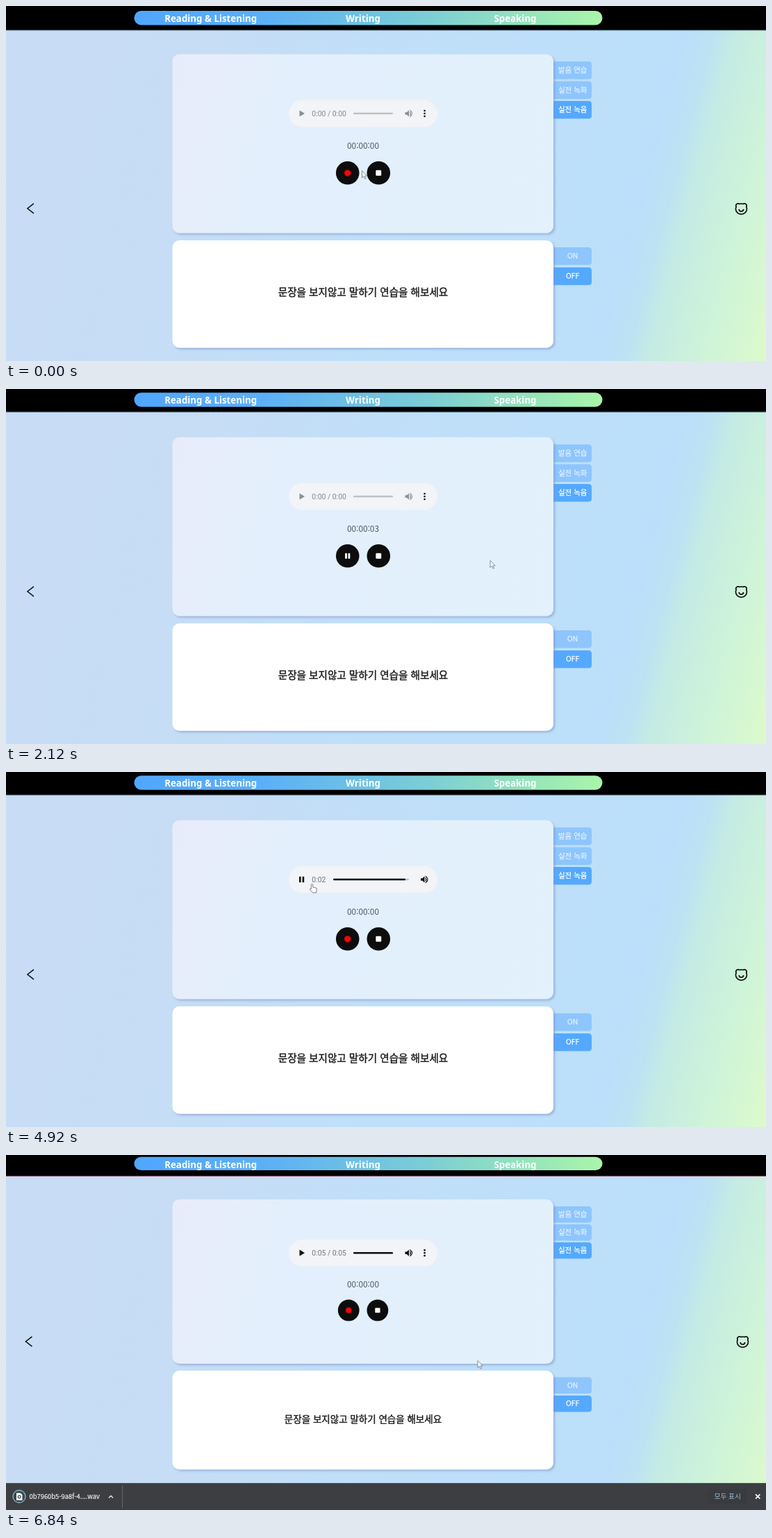
An HTML page for the animation above (6880 ms loop, 1094 by 512 pixels).

```html
<!DOCTYPE html>
<html lang="ko">
<head>
<meta charset="utf-8">
<title>Speaking practice</title>
<style>
html, body { margin: 0; width: 100%; height: 100%; overflow: hidden; background: #000; }
svg { display: block; width: 1094px; height: 512px; }
text { font-family: "Noto Sans CJK KR", "Noto Sans CJK", "Noto Sans KR", sans-serif; }
.nav { font: 700 13.3px "Noto Sans", sans-serif; fill: #fff; text-anchor: middle; }
.tab { font-size: 10.5px; fill: #fff; stroke: #fff; stroke-width: .25px; text-anchor: middle; }
.say { fill: #1c1c1e; stroke: #1c1c1e; stroke-width: .4px; text-anchor: middle; }
.clock { font-size: 11.8px; fill: #4c5560; text-anchor: middle; }
.time { font: 10.4px Roboto, sans-serif; }
.file { font-size: 9.4px; fill: #f1f3f4; stroke: #f1f3f4; stroke-width: .2px; }
.all { font-size: 9.7px; fill: #9cbfd8; text-anchor: middle; }
</style>
</head>
<body>
<svg viewBox="0 0 1094 512">
  <defs>
    <linearGradient id="sky" gradientUnits="userSpaceOnUse" x1="-23" y1="119" x2="1117" y2="425">
      <stop offset="0" stop-color="#c9dcf5"/>
      <stop offset=".25" stop-color="#c6ddf5"/>
      <stop offset=".5" stop-color="#c0dff9"/>
      <stop offset=".8" stop-color="#bbdffa"/>
      <stop offset=".835" stop-color="#bde3f3"/>
      <stop offset=".86" stop-color="#c4ebe4"/>
      <stop offset=".93" stop-color="#cff4d8"/>
      <stop offset="1" stop-color="#dcfacb"/>
    </linearGradient>
    <linearGradient id="glass" gradientUnits="userSpaceOnUse" x1="240" y1="150" x2="788" y2="297">
      <stop offset="0" stop-color="#e7ecfa"/>
      <stop offset=".13" stop-color="#e6eefb"/>
      <stop offset=".26" stop-color="#e3effc"/>
      <stop offset="1" stop-color="#e2f1fc"/>
    </linearGradient>
    <linearGradient id="pill">
      <stop offset="0" stop-color="#50a6fe"/>
      <stop offset=".28" stop-color="#5cb0f6"/>
      <stop offset=".62" stop-color="#7bcdd6"/>
      <stop offset="1" stop-color="#aaf5a9"/>
    </linearGradient>
    <filter id="shade" x="-5%" y="-5%" width="110%" height="115%">
      <feDropShadow dx="2.3" dy="2.3" stdDeviation="1.4" flood-color="#7f93c8" flood-opacity=".55"/>
    </filter>
    <clipPath id="item"><rect id="itemBox" y="473" height="39"/></clipPath>
  </defs>
  <g id="tall"></g>
  <g id="short"></g>
  <g id="header"></g>
  <g id="live"></g>
  <g id="shelf">
    <rect y="473" width="1094" height="40" fill="#3c3e42"/>
    <path d="M0 473.5H1094" stroke="#54565a"/>
    <g clip-path="url(#item)">
      <circle cx="19" cy="492.5" r="9" fill="#34474f" stroke="#8eb6c6" stroke-width="1.3"/>
      <path d="M15 487.5H21L23.5 490V498H15Z" fill="#fff"/>
      <circle cx="19.2" cy="493" r="1.9" fill="none" stroke="#3c3e42" stroke-width="1.2"/>
      <text class="file" x="33.5" y="496">0b7960b5-9a8f-4....wav</text>
      <path d="M148 494.5L151 491.5L154 494.5" fill="none" stroke="#e8eaed" stroke-width="1.4"/>
    </g>
    <path id="divider" d="M0 477V509" stroke="#63666a"/>
    <rect x="1010" y="482" width="57" height="21" rx="3" fill="#393b3f"/>
    <text class="all" x="1038.7" y="495.6">모두 표시</text>
    <path d="M1079 489.3L1085.4 495.7M1085.4 489.3L1079 495.7" stroke="#fff" stroke-width="1.7"/>
  </g>
  <g id="cursor">
    <path id="arrow" d="M0 0V10.2L2.4 8.1L4.1 11.8L5.7 11L4 7.5H7.2Z" fill="#f6f9fc" stroke="#6d7680" stroke-width=".8"/>
    <path id="hand" d="M-1.2 .8Q0 -.7 1.2 .8V4.6L5.6 5.6Q7.2 6 6.9 7.8L6 12.6H1L-3.2 8Q-3.3 6.3 -1.2 7.3Z" fill="#fff" stroke="#555b62" stroke-width=".8"/>
  </g>
</svg>
<script>
const LOOP = 6880;
const REC = 200, STOP = 2900, PLAY = 3760, KNOWN = 5400, RESIZE = 6080, END = 6500;
const SPEED = 2, LENGTH = 5.5;

const TALL = {
  top: 33, card: [69.5, 258], note: [338, 155], tabs: [80, 108.5, 137], toggles: [348, 377], tabH: 25.5,
  say: 14.6, sayY: 418.4, player: 155, clock: 206, btn: 240.8, r: 16.8, rec: 491.7, stop: 536.3,
  back: [35.5, 292], bear: 1058.4
};
const SHORT = {
  top: 30, card: [64, 237], note: [311, 142.5], tabs: [74, 100, 126], toggles: [320.5, 347], tabH: 23.5,
  say: 13.5, sayY: 386.4, player: 141.2, clock: 190.8, btn: 224, r: 15.4, rec: 493.2, stop: 534.9,
  back: [33, 269], bear: 1060.4
};

// time, x, y of the pointer tip
const PATH = [
  [0, 512.5, 237.5], [160, 494, 241], [320, 494, 241], [1000, 805, 249.5], [1750, 805, 249.5],
  [2600, 538.5, 244], [3000, 538.5, 244], [3560, 427, 156], [3800, 427, 156], [4040, 605, 235],
  [4300, 612, 238], [4860, 440.5, 161.5], [5040, 440.5, 161.5], [5560, 601, 156], [5720, 601, 156],
  [6000, 533, 146], [6200, 560, 170], [6640, 679, 296.5], [LOOP, 679, 296.5]
];

const $ = id => document.getElementById(id);
const clamp = v => Math.max(0, Math.min(1, v));
const smooth = v => v * v * (3 - 2 * v);
const easeOut = v => 1 - (1 - clamp(v)) ** 2;
const box = (x, y, w, h, r, fill, more = '') =>
  `<rect x="${x}" y="${y}" width="${w}" height="${h}" rx="${r}" fill="${fill}" ${more}/>`;
const dot = (x, y, r, fill) => `<circle cx="${x}" cy="${y}" r="${r}" fill="${fill}"/>`;
const label = (cls, x, y, s, more = '') => `<text class="${cls}" x="${x}" y="${y}" ${more}>${s}</text>`;
const pad = n => String(n).padStart(2, '0');

function tab(L, y, name, on) {
  const h = L.tabH;
  return `<path d="M788 ${y}H838.5Q843 ${y} 843 ${y + 4.5}V${y + h - 4.5}Q843 ${y + h} 838.5 ${y + h}H788Z"
    fill="${on ? '#54a9fe' : '#8ec5fd'}"/>` +
    label('tab', 815.7, y + h / 2 + 3.6, name, on ? '' : 'opacity=".75"');
}

function page(L) {
  const [c, ch] = L.card, [n, nh] = L.note, [bx, by] = L.back;
  return `<rect y="${L.top}" width="1094" height="${512 - L.top}" fill="url(#sky)"/>` +
    ['발음 연습', '실전 녹화', '실전 녹음'].map((s, i) => tab(L, L.tabs[i], s, i == 2)).join('') +
    ['ON', 'OFF'].map((s, i) => tab(L, L.toggles[i], s, i == 1)).join('') +
    box(239.5, c, 548.5, ch, 10, 'url(#glass)', 'filter="url(#shade)"') +
    box(239.5, n, 548.5, nh, 10, '#fff', 'filter="url(#shade)"') +
    label('say', 514, L.sayY, '문장을 보지않고 말하기 연습을 해보세요', `font-size="${L.say}"`) +
    `<path d="M${bx + 4.5} ${by - 7.2}L${bx - 4.5} ${by}L${bx + 4.5} ${by + 7.2}" fill="none" stroke="#111" stroke-width="1.6"/>
    <g transform="translate(${L.bear} ${by - .2})" fill="none" stroke="#111" stroke-width="1.7">
      <path d="M-2.6 -6.3Q0 -6.9 2.6 -6.3A3.2 3.2 0 0 1 7.3 -2.2Q8 -.5 8 1A8 7.6 0 0 1 -8 1Q-8 -.5 -7.3 -2.2A3.2 3.2 0 0 1 -2.6 -6.3Z"/>
      <path d="M-3.2 1.2A3.2 3.2 0 0 0 3.2 1.2"/>
    </g>`;
}

function header() {
  return box(0, -10, 1094, 43, 0, '#000') + '<path id="edge" d="M0 33H1094"/>' +
    box(184.5, 5.3, 674, 20.4, 10.2, 'url(#pill)', 'id="pillBox"') +
    label('nav', 294.7, 21.2, 'Reading &amp; Listening') +
    label('nav', 514, 21.2, 'Writing') + label('nav', 733, 21.2, 'Speaking');
}

function speaker(x, y, col) {
  return `<path d="M${x - 5.5} ${y - 1.8}h2.5l3 -3v9.6l-3 -3h-2.5Z" fill="${col}"/>
    <path d="M${x + 1.3} ${y - 2.4}q2.2 2.4 0 4.8M${x + 1.4} ${y - 4.7}q6.4 4.7 0 9.4" fill="none" stroke="${col}" stroke-width="1.2"/>`;
}

function player(t, y, hover) {
  const loaded = t >= STOP, playing = t >= PLAY && t < END;
  const open = loaded && t < KNOWN;
  const pos = t < PLAY ? 0 : Math.min(LENGTH, (t - PLAY) * SPEED / 1000);
  const now = '0:' + pad(Math.floor(pos));
  const ink = loaded ? '#111' : '#8c8f92';
  const x0 = open ? 471 : 500, x1 = open ? 580 : 557;
  const part = open ? (playing ? .955 : 0) : pos / LENGTH;
  const x = x0 + (x1 - x0) * part;
  let s = box(407, y - 19.2, 214, 38.6, 19.3, '#f2f4f7');
  s += playing
    ? box(422, y - 4.2, 2.6, 8.4, 0, ink) + box(426.6, y - 4.2, 2.6, 8.4, 0, ink)
    : `<path d="M422.5 ${y - 4.6}L430 ${y}L422.5 ${y + 4.6}Z" fill="${ink}"/>`;
  s += label('time', 440.3, y + 4.1, open ? now : `${now} / ${loaded ? '0:05' : '0:00'}`, `fill="${loaded ? '#737679' : '#85888b'}"`);
  s += box(x0, y - 1.3, x1 - x0, 2.6, 1.3, '#bfc1c3');
  if (part) s += box(x0, y - 1.3, x - x0, 2.6, 1.3, '#111');
  if (!open && playing && hover) s += dot(x, y, 4.2, '#4b4d50');
  s += speaker(open ? 602.5 : 580, y, ink);
  if (!open) s += [-4, 0, 4].map(d => dot(602.6, y + d, 1.35, '#111')).join('');
  return s;
}

function controls(L, t) {
  const rec = t >= REC && t < STOP, k = L.r / 17, y = L.btn;
  const sec = rec ? Math.floor((t - REC) * SPEED / 1000) : 0;
  let s = label('clock', 514, L.clock, '00:00:' + pad(sec));
  s += dot(L.rec, y, L.r, '#0d0d0e') + dot(L.stop, y, L.r, '#0d0d0e');
  s += rec
    ? box(L.rec - 3.6, y - 4, 2.8, 8, .9, '#fff') + box(L.rec + .8, y - 4, 2.8, 8, .9, '#fff')
    : dot(L.rec, y, 5.2 * k, '#8a0505') + dot(L.rec, y, 4.2 * k, '#fa0505');
  return s + box(L.stop - 4 * k, y - 4 * k, 8 * k, 8 * k, 1.2, '#fff');
}

function pointer(t) {
  const i = PATH.findIndex(p => p[0] > t), a = PATH[i - 1], b = PATH[i];
  const k = smooth((t - a[0]) / (b[0] - a[0]));
  return [a[1] + (b[1] - a[1]) * k, a[2] + (b[2] - a[2]) * k];
}

function draw(t) {
  const small = t >= RESIZE, L = small ? SHORT : TALL;
  $('tall').style.display = small ? 'none' : '';
  $('short').style.display = small ? '' : 'none';

  const drop = t < 40 ? 1.8 : small ? -2.6 : 0;
  $('header').setAttribute('transform', `translate(0 ${drop})`);
  $('pillBox').setAttribute('height', small ? 19.4 : 20.4);
  $('edge').setAttribute('stroke', small ? '#8f4a5f' : '#33424f');

  const [x, y] = pointer(t);
  const over = Math.abs(x - 514) < 107 && Math.abs(y - L.player) < 19;
  const press = [L.rec, L.stop].some(c => Math.hypot(x - c, y - L.btn) < L.r);
  $('live').innerHTML = player(t, L.player, over) + controls(L, t);

  $('cursor').setAttribute('transform', `translate(${x} ${y})`);
  $('hand').style.display = over || press ? '' : 'none';
  $('arrow').style.display = over || press ? 'none' : '';

  const rise = 39 * (1 - easeOut((t - 5870) / 213));
  const wide = 30 + 137.5 * easeOut((t - 6000) / 220);
  $('shelf').style.display = rise < 39 ? '' : 'none';
  $('shelf').setAttribute('transform', `translate(0 ${rise})`);
  $('itemBox').setAttribute('width', wide);
  $('divider').setAttribute('transform', `translate(${wide} 0)`);
}

$('tall').innerHTML = page(TALL);
$('short').innerHTML = page(SHORT);
$('header').innerHTML = header();

const start = performance.now();
function tick() {
  draw((performance.now() - start) % LOOP);
  requestAnimationFrame(tick);
}
draw(0);
requestAnimationFrame(tick);
</script>
</body>
</html>
```
